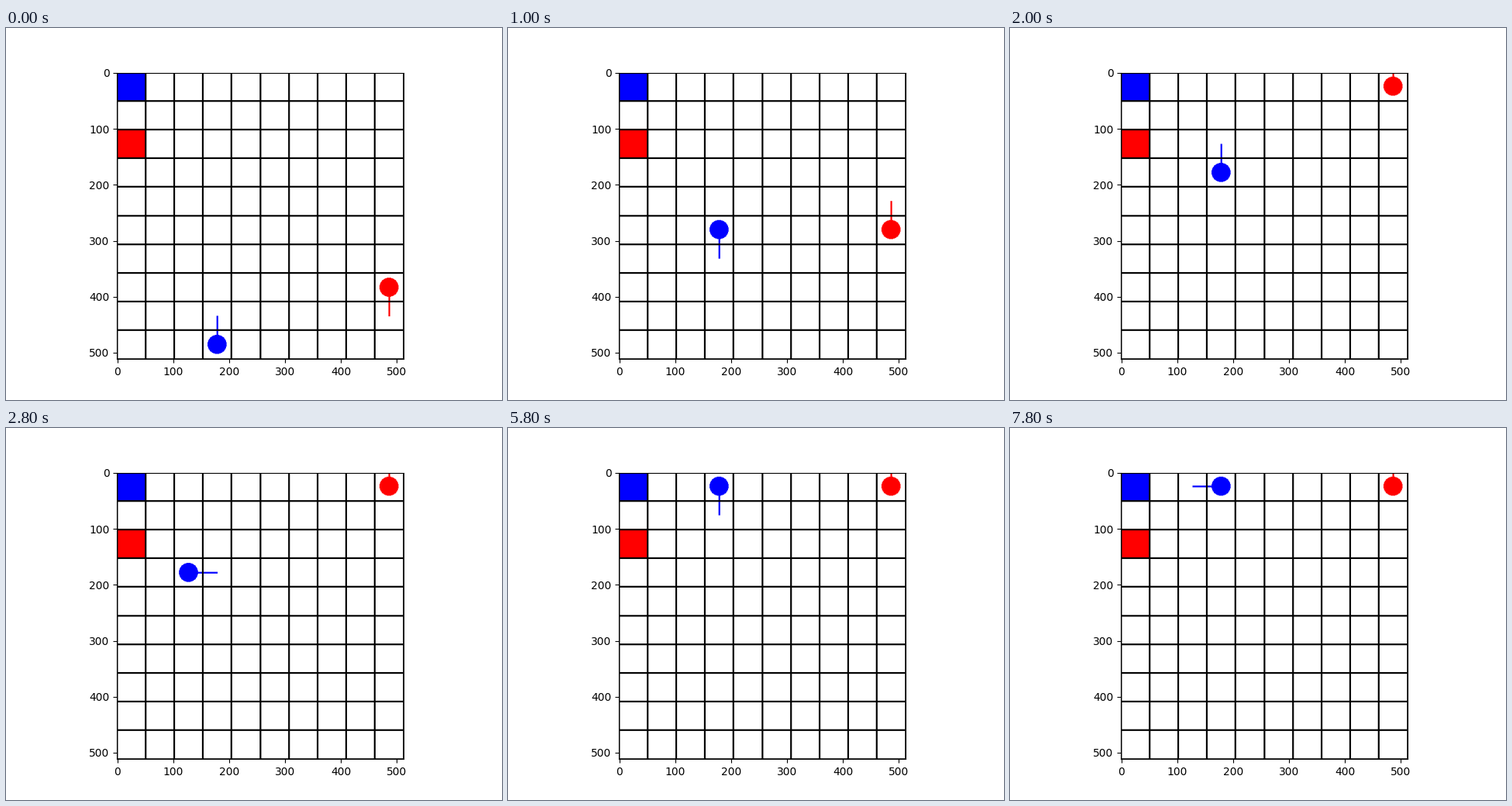
Recreate the animation shown at these times as a matplotlib script. Size 640 px wide and 480 px high, loop 8 s.

```python
import matplotlib.pyplot as plt
import numpy as np
from matplotlib.animation import FuncAnimation

SIZE, CELLS = 512, 10
CELL = SIZE / CELLS
STEP_MS = 200
BLUE, RED = (0, 0, 255), (255, 0, 0)
DIRS = {"U": (0, -1), "D": (0, 1), "L": (-1, 0), "R": (1, 0)}

BLUE_MOVES = "UUUUDUURUULLURRUULUU" + "U" * 8 + "DUDUUDUUUUL"
RED_MOVES = "UULUU" + "U" * 14 + "R" + "U" * 12 + "RUUUDUU"

ys, xs = np.mgrid[0:SIZE, 0:SIZE]


def walk(col, row, facing, moves):
    """Turn when the heading differs, otherwise step ahead until the wall."""
    poses = [(col, row, facing)]
    for move in moves:
        if move == facing:
            dx, dy = DIRS[move]
            col = min(max(col + dx, 0), CELLS - 1)
            row = min(max(row + dy, 0), CELLS - 1)
        facing = move
        poses.append((col, row, facing))
    return poses


def center(cell):
    return int((cell + 0.5) * CELL)


def fill_cell(img, col, row, color):
    x, y = int(col * CELL), int(row * CELL)
    side = int(CELL)
    img[y:y + side, x:x + side] = color


def draw_agent(img, pose, color):
    col, row, facing = pose
    dx, dy = DIRS[facing]
    x, y = center(col), center(row)
    tip_x, tip_y = center(col + dx), center(row + dy)
    disc = (xs - x + 0.5) ** 2 + (ys - y + 0.5) ** 2 <= int(CELL / 3) ** 2
    pad_x, pad_y = abs(dy), abs(dx)
    pointer = ((xs >= min(x, tip_x) - pad_x) & (xs <= max(x, tip_x) + pad_x)
               & (ys >= min(y, tip_y) - pad_y) & (ys <= max(y, tip_y) + pad_y))
    img[disc | pointer] = color


def draw_grid(img):
    for k in range(CELLS + 1):
        p = int(k * CELL)
        band = slice(max(p - 1, 0), p + 2)
        img[band, :] = 0
        img[:, band] = 0


def render(step):
    img = np.full((SIZE, SIZE, 3), 255, dtype=np.uint8)
    fill_cell(img, 0, 0, BLUE)
    fill_cell(img, 0, 2, RED)
    draw_agent(img, blue_path[step], BLUE)
    draw_agent(img, red_path[step], RED)
    draw_grid(img)
    return img


blue_path = walk(3, 9, "U", BLUE_MOVES)
red_path = walk(9, 7, "D", RED_MOVES)

fig, ax = plt.subplots(figsize=(6.4, 4.8), dpi=100)
board = ax.imshow(render(0))


def update(step):
    board.set_data(render(step))
    return [board]


anim = FuncAnimation(fig, update, frames=len(blue_path), interval=STEP_MS,
                     repeat=True, repeat_delay=0)
plt.show()
```
